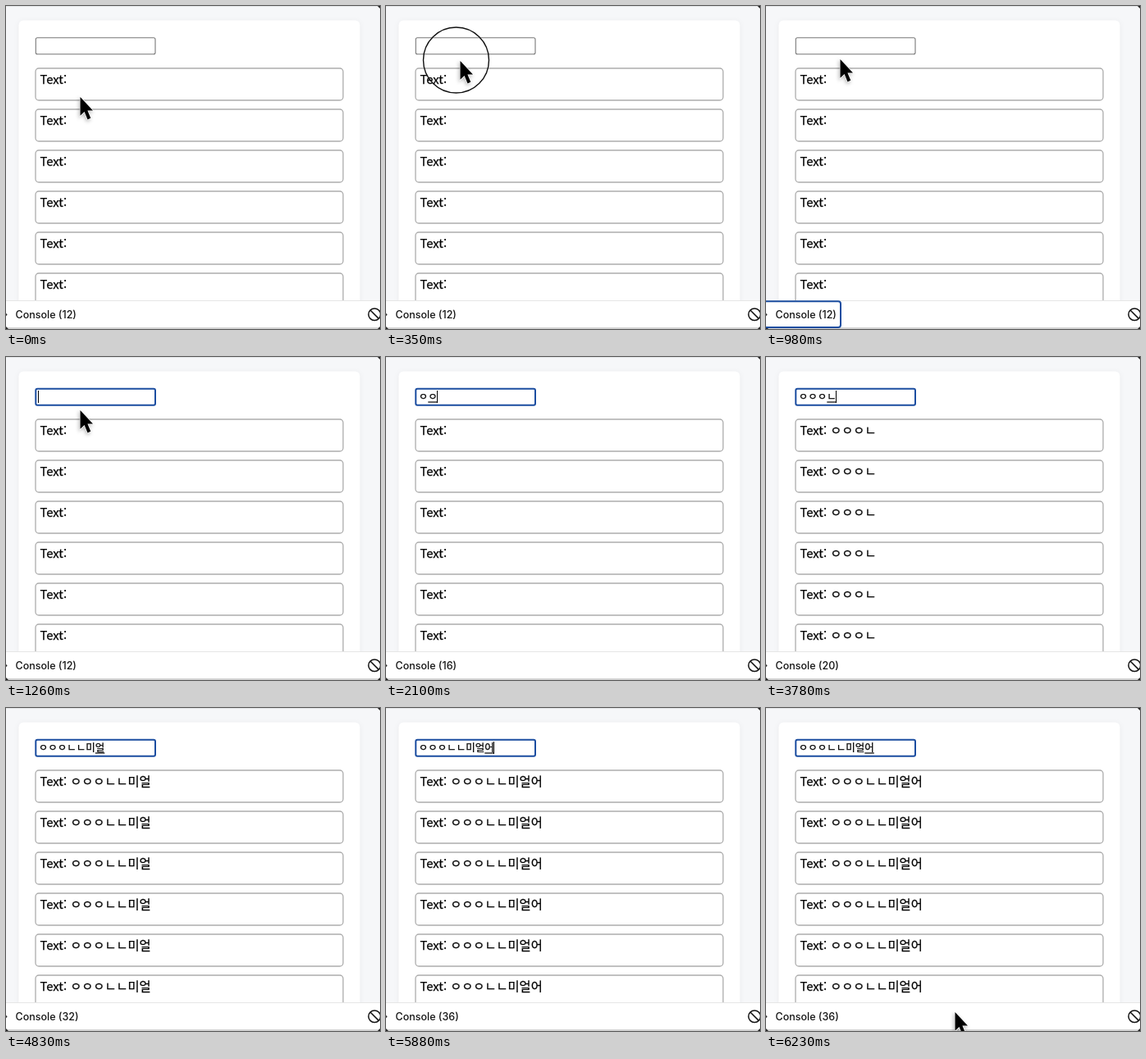
Animation, 456 px wide and 394 px high, one loop 6440 ms. Source, as an HTML page:

```html
<!DOCTYPE html>
<html lang="ko">
<head>
<meta charset="utf-8">
<style>
  html, body { margin: 0; width: 100%; height: 100%; overflow: hidden; background: #f6f7f9; }
  svg { display: block; }
  text { white-space: pre; }
  .page { font: 14.8px "Noto Sans CJK KR", "Noto Sans CJK", sans-serif; }
  .page text { stroke: #000; stroke-width: .25px; }
  .page tspan { font-size: 15.3px; }
  #typed { font-size: 12.5px; }
  #console { font: 500 12.5px Inter, sans-serif; fill: #151515; }
  #card { filter: drop-shadow(0 1px 3px #0000000d); }
  #arrow { filter: drop-shadow(-1px 2px 2px #0004); }
</style>
</head>
<body>
<svg width="456" height="394" viewBox="0 0 456 394">
  <rect id="card" x="15.5" y="17.5" width="416" height="400" rx="6" fill="#fff"/>
  <rect id="input" x="36.3" y="38.8" width="145.7" height="20" rx="2" fill="#fff"/>
  <g class="page">
    <text id="typed" x="39.8" y="53"></text>
    <path id="underline" stroke="#000" stroke-width="1.2"/>
    <path id="caret" stroke="#000"/>
    <g id="rows"></g>
  </g>
  <rect y="359" width="456" height="35" fill="#fff"/>
  <path d="M0 359.5H456" stroke="#e6e6e6"/>
  <path d="M0 393H456" stroke="#c4c4c4" stroke-width="1.4"/>
  <path d="M0 0H456" stroke="#d2d3d5"/>
  <path d="M0 391V394H3ZM456 391V394H453ZM456 0V3L453 0Z" fill="#222"/>
  <path d="M0 374.8L1.6 376.5L0 378.2Z" fill="#222"/>
  <rect id="ring" x="-6" y="360.2" width="97" height="31.8" rx="3" fill="none" stroke="#1b4da0" stroke-width="2"/>
  <text id="console" x="11.5" y="381"></text>
  <g fill="none" stroke="#111" stroke-width="1.5">
    <circle cx="449.3" cy="376.2" r="7.3"/>
    <path d="M444.1 371L454.5 381.4"/>
  </g>
  <g id="pointer">
    <circle id="click" cx="-4.5" cy="-1" r="40" fill="none" stroke="#111" stroke-width="1.4"/>
    <path id="arrow" d="M.5 0V22.8L5.6 18L9.5 27.4L13.3 25.8L9.4 16.6H16Z" stroke="#fff" stroke-width="1.4" paint-order="stroke"/>
  </g>
</svg>
<script>
const LOOP = 6440, STEP = 70;
const BLINK = 535, DEBOUNCE = 525, PRESS = 210;
const PANEL_FOCUS = 420, INPUT_FOCUS = 1120, EXIT = 6090;
const presses = [280, 1050];
const $ = id => document.getElementById(id);

// Bursts of typing: first key, gap between keys, and the text after each key.
const bursts = [
  [1780, 307, "ㅇ ㅇㅇ ㅇㅇㅇ ㅇㅇㅇㄴ"],
  [4060, 42, "ㄴ ㄴㅁ ㄴ미 ㄴ미ㅇ ㄴ미어 ㄴ미얼"],
  [5250, 100, "ㅇ 어"],
];
const keys = [{ time: INPUT_FOCUS, text: "" }];
for (const [start, gap, stages] of bursts) {
  const before = keys.at(-1).text;
  stages.split(" ").forEach((s, i) => keys.push({ time: start + i * gap, text: before + s }));
}
// Only a key followed by a long enough pause reaches the rows.
const settled = keys.filter((key, i) => !(keys[i + 1]?.time < key.time + DEBOUNCE));

const clamp = x => Math.min(1, Math.max(0, x));
const show = (id, on) => $(id).setAttribute("visibility", on ? "visible" : "hidden");
const set = (id, attrs) => Object.entries(attrs).forEach(([k, v]) => $(id).setAttribute(k, v));

for (let y = 76; y < 360; y += 50) {
  $("rows").innerHTML += `<rect x="36" y="${y}" width="375" height="39" rx="4" fill="#fff" stroke="#adadad" stroke-width="1.3"/>
    <text x="41.5" y="${y + 19}">Text: <tspan></tspan></text>`;
}
const labels = document.querySelectorAll("#rows tspan");

function pointerAt(t) {
  if (t >= EXIT) {
    const p = clamp((t - EXIT) / 140);
    return [201 + 29 * p, 263 + 108 * p];
  }
  return [90, 67 + 44 * (1 - clamp(t / 280)) ** 2 - 2 * clamp((t - 630) / 140)];
}

function draw(t) {
  const pressed = keys.filter(key => key.time <= t);
  const { time, text } = pressed.at(-1) ?? keys[0];
  const focused = t >= INPUT_FOCUS;

  $("typed").textContent = text;
  const left = 39.8;
  const end = left + (text && $("typed").getComputedTextLength());
  const last = text && $("typed").getSubStringLength(text.length - 1, 1);
  set("underline", { d: text ? `M${end - last} 55H${end}` : "" });
  set("caret", { d: `M${Math.floor(end) + .5} 41V56` });
  show("caret", focused && Math.floor((t - time) / BLINK) % 2 === 0);
  set("input", { stroke: focused ? "#1b4da0" : "#777", "stroke-width": focused ? 2 : 1.1 });

  const label = settled.findLast(key => key.time + DEBOUNCE <= t)?.text ?? "";
  labels.forEach(span => span.textContent = label);
  $("console").textContent = `Console (${12 + 2 * Math.max(0, pressed.length - 1)})`;
  show("ring", t >= PANEL_FOCUS && !focused);

  const visible = !text || t >= EXIT;
  show("pointer", visible);
  show("click", visible && presses.some(start => t >= start && t < start + PRESS));
  set("pointer", { transform: `translate(${pointerAt(t)})` });
}

function tick(now) {
  draw(Math.floor(now % LOOP / STEP) * STEP);
  requestAnimationFrame(tick);
}
draw(0);
requestAnimationFrame(tick);
</script>
</body>
</html>
```
